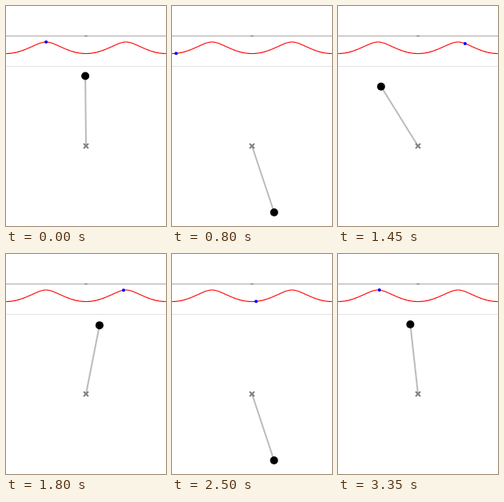
Recreate the animation shown at these times as an HTML page. Size 200x275 px, loop 3.4 s.

```html
<!DOCTYPE html>
<html>
<head>
<meta charset="utf-8">
<title>Rotating pendulum</title>
<style>
html, body { margin: 0; width: 100%; height: 100%; overflow: hidden; background: #fff; }
svg { display: block; width: 200px; height: 275px; }
</style>
</head>
<body>
<svg viewBox="0 0 200 275" fill="none">
  <path d="M0 37.5H200" stroke="#aaa"/>
  <path d="M0 75.5H200" stroke="#e2e2e2"/>
  <path d="M98.8 36.3l2.4 2.4m0-2.4l-2.4 2.4" stroke="#808080"/>
  <path id="curve" stroke="#f00" stroke-width="1.1"/>
  <circle id="dot" r="2" fill="#00f"/>
  <line id="rod" x1="100" y1="175" stroke="#bbb" stroke-width="2"/>
  <circle id="bob" r="5" fill="#000"/>
  <path d="M97 172l6 6m0-6l-6 6" stroke="#808080" stroke-width="2"/>
</svg>
<script>
const LOOP = 3400, STEP = 50, LENGTH = 87.5;
const $ = id => document.getElementById(id);
const set = (id, attrs) => {
  for (const k in attrs) $(id).setAttribute(k, attrs[k]);
};

// Angular speed by energy conservation: 2.012 rad/s at the top, 5.9 at the bottom
const speed = a => Math.sqrt(4.05 + 15.38 * (1 + Math.cos(a)));
const phaseY = a => 37.5 + 3.73 * speed(a);

// Angle from straight down after ms, by midpoint integration
function angleAt(ms) {
  const dt = 0.001;
  let a = Math.PI + 0.01;
  for (let i = 0; i < ms; i++) a -= speed(a - speed(a) * dt / 2) * dt;
  return a;
}

let d = "";
for (let x = 0; x <= 200; x++) d += (x ? "L" : "M") + x + " " + phaseY(x * Math.PI / 50).toFixed(2);
set("curve", { d });

function draw(now) {
  const a = angleAt(Math.floor(now % LOOP / STEP) * STEP);
  const x = 100 + LENGTH * Math.sin(a), y = 175 + LENGTH * Math.cos(a);
  set("dot", { cx: (a * 50 / Math.PI + 400) % 200, cy: phaseY(a) });
  set("rod", { x2: x, y2: y });
  set("bob", { cx: x, cy: y });
}

const start = performance.now();
function tick() {
  draw(performance.now() - start);
  requestAnimationFrame(tick);
}
tick();
</script>
</body>
</html>
```
